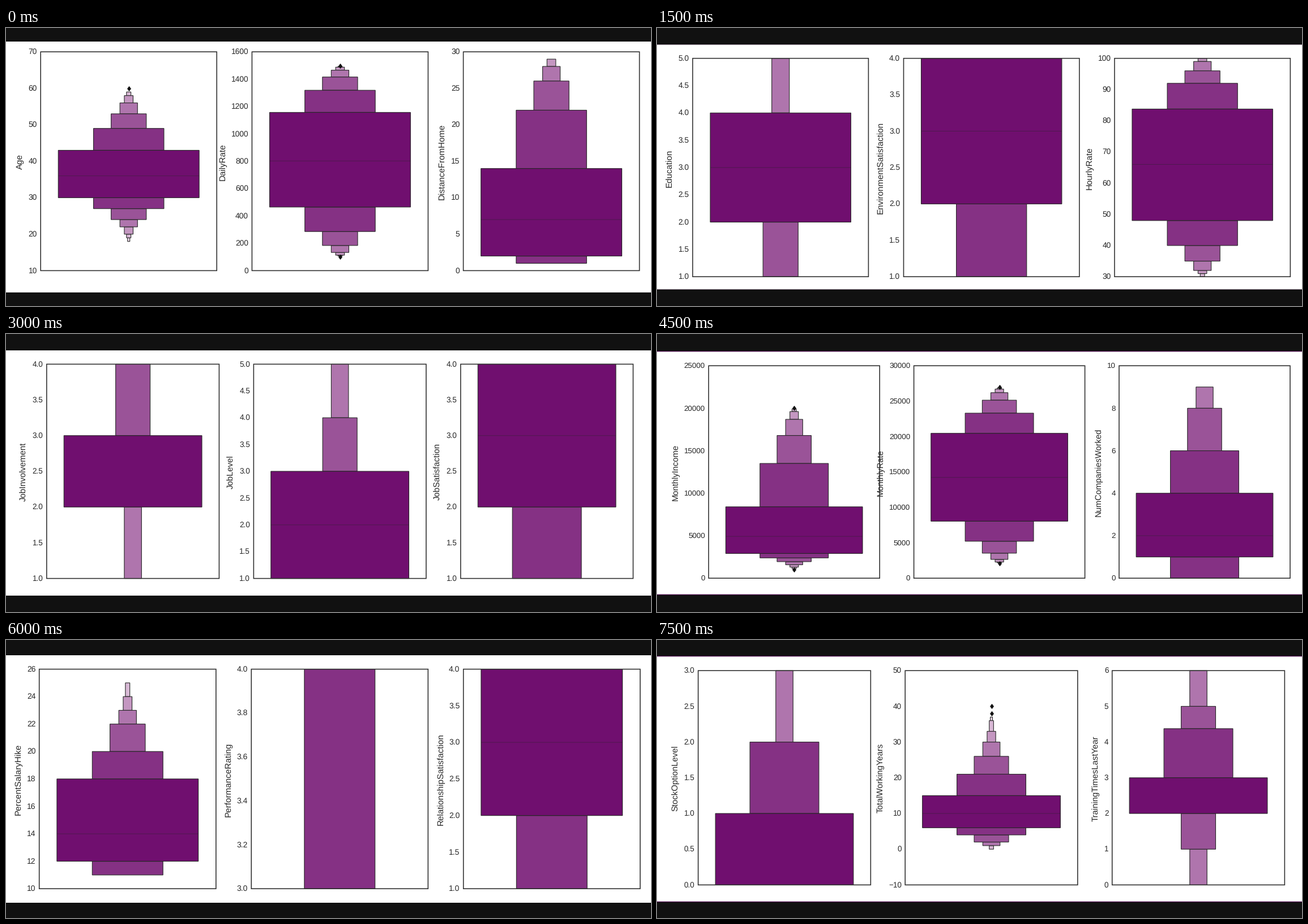
These frames come from a looping animation (1139x492 px, 8000 ms). A matplotlib script:

```python
from math import log10, floor

import matplotlib.pyplot as plt
import numpy as np
from matplotlib.animation import FuncAnimation
from matplotlib.patches import Rectangle

W, H, DPI = 1139, 492, 64
PX = 72 / DPI  # points per pixel
INK, BAR, RIM = "#262626", "#111111", "#4a0f4a"
LEVELS = np.arange(7)  # each level halves the tail and the box width
PITCH, ASPECT = 1.2, 1.245  # panel spacing and height, in panel widths

plt.rcParams.update({"font.family": "Liberation Sans", "text.hinting": "none"})


def ordinal(label, first, *counts):
    """Letter values of whole numbers that occur `counts` times from `first` on."""
    data = np.repeat(np.arange(first, first + len(counts)), counts)
    tail = 0.5 ** (LEVELS + 2)
    return dict(label=label, limits=(first, first + len(counts) - 1),
                median=np.median(data), lower=np.quantile(data, tail),
                upper=np.quantile(data, 1 - tail), outliers=())


def spread(label, limits, summary, powers, outliers=()):
    """Letter values that ease from each quartile to its end by a power curve."""
    low, q1, median, q3, high = summary

    def tail(quartile, end, power):
        values = end + (quartile - end) * (1 - LEVELS / LEVELS[-1]) ** power
        return np.append(quartile, np.round(values[1:]))

    return dict(label=label, limits=limits, median=median, outliers=outliers,
                lower=tail(q1, low, powers[0]), upper=tail(q3, high, powers[1]))


def satisfaction(label):
    return ordinal(label, 1, 284, 287, 453, 446)


# half height of the white band, left, top, panel width, rim, panels
SLIDES = [
    (222, 61.2, 42.2, 311, 0, [
        spread("Age", (10, 70), (18, 30, 36, 43, 59), (1.58, 2.58), [60]),
        spread("DailyRate", (0, 1600), (107, 465, 802, 1157, 1494), (3.8, 3.6), [102, 1499]),
        spread("DistanceFromHome", (0, 30), (1, 2, 7, 14, 29), (9, 4))]),
    (216.5, 63, 53.7, 310.4, 0, [
        ordinal("Education", 1, 170, 282, 572, 398, 48),
        satisfaction("EnvironmentSatisfaction"),
        spread("HourlyRate", (30, 100), (30, 48, 66, 83.75, 100), (3.2, 3.6))]),
    (217, 71.8, 53.4, 304.6, 0, [
        ordinal("JobInvolvement", 1, 83, 375, 868, 144),
        ordinal("JobLevel", 1, 543, 534, 218, 106, 69),
        satisfaction("JobSatisfaction")]),
    (214.7, 91.2, 56.2, 302, 1.3, [
        spread("MonthlyIncome", (0, 25000), (1050, 2911, 4919, 8400, 19950), (1.8, 3.2),
               [1009, 19999]),
        spread("MonthlyRate", (0, 30000), (2170, 8050, 14236, 20460, 26900), (3.6, 3.2),
               [2094, 26999]),
        spread("NumCompaniesWorked", (0, 10), (0, 1, 2, 4, 9), (9, 3.5))]),
    (219, 58.7, 51.6, 312.1, 0, [
        spread("PercentSalaryHike", (10, 26), (11, 12, 14, 18, 25), (9, 1.85)),
        ordinal("PerformanceRating", 3, 1244, 226),
        satisfaction("RelationshipSatisfaction")]),
    (216.7, 72.7, 54.2, 304.6, 1.3, [
        ordinal("StockOptionLevel", 0, 631, 596, 158, 85),
        spread("TotalWorkingYears", (-10, 50), (0, 6, 10, 15, 37), (2.22, 1.62), [38, 40]),
        ordinal("TrainingTimesLastYear", 0, 54, 71, 547, 491, 123, 119, 65)]),
]

fig = plt.figure(figsize=(W / DPI, H / DPI), dpi=DPI)
ax = fig.add_axes([0, 0, 1, 1])


def shade(level):
    return tuple(np.array([112 + 21 * level, 15 + 34 * level, 111 + 20.5 * level]) / 255)


def rect(x, y, w, h, fill="none", edge="none", lw=0.0, z=1.0):
    ax.add_patch(Rectangle((x, y), w, h, fc=fill, ec=edge, lw=lw * PX,
                           joinstyle="miter", snap=False, zorder=z))


def band(half, color, z):
    rect(0, H / 2 - half, W, 2 * half, color, z=z)


def tick_step(span):
    """Smallest 1, 2 or 5 times a power of ten that gives at most eight steps."""
    base = 10.0 ** floor(log10(span / 8))
    return next(m * base for m in (1, 2, 5, 10) if span / (m * base) < 8.01)


def em_width(text):
    return sum({".": .278, "−": .584}.get(c, .556) for c in text)


def draw_panel(left, top, width, label, limits, median, lower, upper, outliers):
    low, high = limits
    height = ASPECT * width
    bottom, center = top + height, left + width / 2
    label_size = width * 0.0488
    tick_size = label_size * 10 / 11

    def y_of(value):
        return bottom - (value - low) / (high - low) * height

    def box(level, a, b):
        if a != b:
            w = 0.8 * width / 2 ** level
            y = y_of(max(a, b))
            rect(center - w / 2, y, w, y_of(min(a, b)) - y, shade(level), INK, 1.1, 2)

    def text(x, y, string, size, **style):
        ax.text(x, y, string, size=size * PX, color=INK, va="baseline", zorder=6, **style)

    for values in (lower, upper):
        for level in LEVELS[:0:-1]:
            box(level, values[level - 1], values[level])
    box(0, lower[0], upper[0])
    if lower[0] < median < upper[0]:
        ax.plot([center - .4 * width, center + .4 * width], [y_of(median)] * 2, color=INK,
                alpha=.45, lw=PX, solid_capstyle="butt", snap=False, zorder=3)
    ax.plot([center] * len(outliers), [y_of(v) for v in outliers], "d",
            color=BAR, ms=6 * PX, mew=.8 * PX, zorder=4)
    rect(left, top, width, height, edge="#303030", lw=1.6, z=5)

    step = tick_step(high - low)
    ticks = np.arange(low, high + step / 2, step)
    names = [f"{v:.{int(step < 1)}f}".replace("-", "−") for v in ticks]
    for value, name in zip(ticks, names):
        text(left - 6.3, y_of(value) + 4, name, tick_size, ha="right")
    label_x = left - 17.2 - tick_size * max(map(em_width, names))
    text(label_x, top + height / 2 + 1, label, label_size,
         rotation=90, rotation_mode="anchor", ha="center")


def draw(frame):
    ax.clear()
    ax.set(xlim=(0, W), ylim=(H, 0))
    ax.axis("off")
    half, left, top, width, rim, panels = SLIDES[frame // 3]
    band(H / 2, BAR, 0)
    band(half + rim, RIM, 0.5)
    band(half, "white", 1)
    for i, panel in enumerate(panels):
        draw_panel(left + i * PITCH * width, top, width, **panel)
    return []


anim = FuncAnimation(fig, draw, frames=16, interval=500, init_func=lambda: draw(0),
                     repeat=True, repeat_delay=0, blit=False)
plt.show()
```
